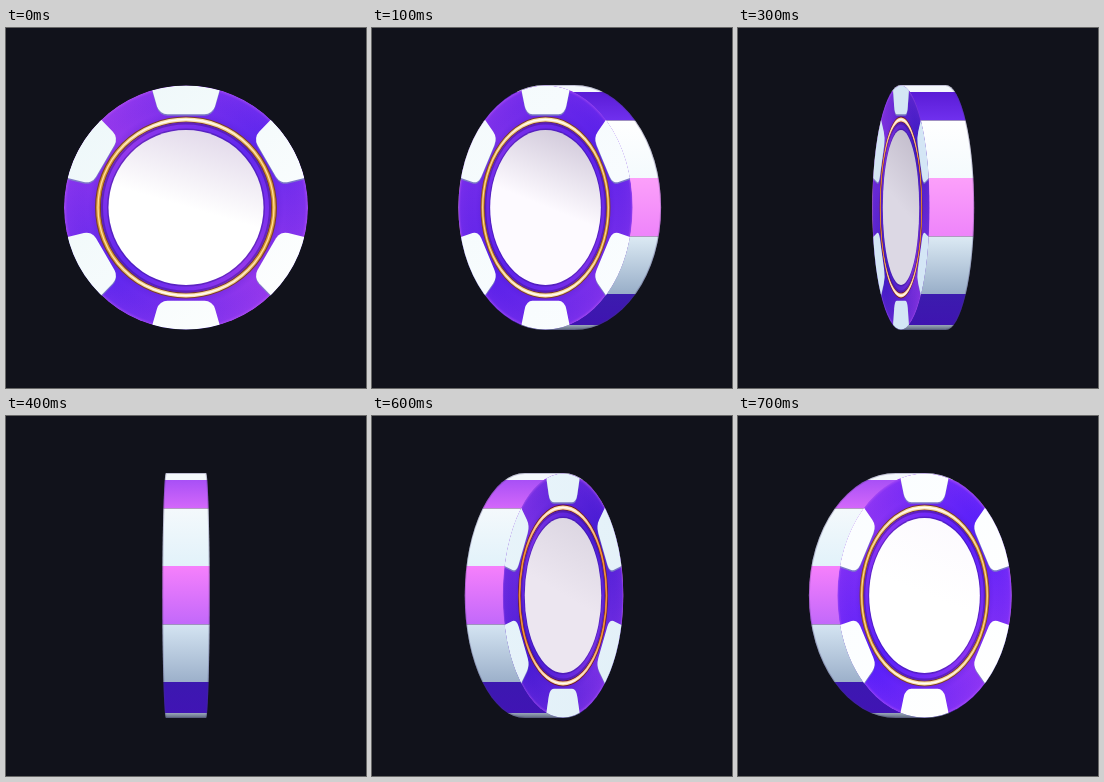
Write an HTML page with a canvas that moves like this. It is 360 px wide and 360 px high and loops after 0.8 s.

```html
<!DOCTYPE html>
<html lang="en">
<head>
<meta charset="utf-8">
<title>Spinning chip</title>
<style>
  html, body { margin: 0; width: 100%; height: 100%; overflow: hidden; background: #11121b; }
  canvas { display: block; width: 100vmin; height: 100vmin; }
</style>
</head>
<body>
<canvas id="stage" width="360" height="360"></canvas>
<script>
const ctx = document.getElementById('stage').getContext('2d');
const CY = 179.5, R = 122, STEP = 100, TAU = Math.PI * 2;
const HALF = 16 * Math.PI / 180;
const BANDS = [57, 64, 92.5, 150, 208.5, 266, 297, 303];

// Rim colours from top to bottom, each a vertical pair
const rightRim = [
  ['#f4f8fc', '#f4f8fc'], ['#5a1cd6', '#7030ee'], ['#ffffff', '#f4fafd'],
  ['#fca0fa', '#ee84fa'], ['#dceaf4', '#98aec8'], ['#3c1cae', '#3e14b0'], ['#9aa8ba', '#505a70']
];
const leftRim = [
  ['#f4f8fc', '#f4f8fc'], ['#a850f6', '#d468fa'], ['#f4f9fc', '#e2f2fa'],
  ['#f680fc', '#c268fa'], ['#d4e4f2', '#9cb0ca'], ['#3c18b0', '#4014b4'], ['#9aa8ba', '#505a70']
];

const bright = ['#7c4028', '#ffe6b4', '#d89838', '#ffdf94'];
const dull = ['#6e1c28', '#ffdcb0', '#e07a2c', '#f4a04c'];

// k: face width ratio, cx: face centre, depth: offset of the far side
const poses = [
  { k: 1, cx: 180, depth: 0, rim: rightRim, sheen: ['#9438ec', '#6128ee'], tab: ['#ecf7f9', '#ffffff'], plate: ['#e2d9ea', '#ffffff'], metal: bright },
  { k: .714, cx: 173.5, depth: 28.5, rim: rightRim, sheen: ['#7c30ea', '#5c22ea'], tab: ['#f4fafc', '#fafdff'], plate: ['#d2cadb', '#fdfaff'], metal: bright },
  { k: .494, cx: 169, depth: 37.5, rim: rightRim, sheen: ['#762ee0', '#4a1cd0'], tab: ['#dcedf7', '#d0e4f2'], plate: ['#c9c2d0', '#e0d9e6'], metal: dull },
  { k: .235, cx: 163, depth: 44.5, rim: rightRim, sheen: ['#7c30dc', '#421cc4'], tab: ['#d4e6f4', '#d4e6f6'], plate: ['#c4becd', '#dcd8e4'], metal: dull },
  { k: .03, cx: 160, depth: 40, rim: leftRim },
  { k: .235, cx: 197, depth: -45, rim: leftRim, sheen: ['#6024d0', '#3e18c0'], tab: ['#d8eaf6', '#cce2f2'], plate: ['#c9c2cd', '#d6cfdc'], metal: dull },
  { k: .494, cx: 191, depth: -38, rim: leftRim, sheen: ['#7830e4', '#4a1cd4'], tab: ['#e8f4fa', '#e2f0f8'], plate: ['#dcd6e2', '#ece6f0'], metal: dull },
  { k: .714, cx: 186.5, depth: -28.5, rim: leftRim, sheen: ['#8c34f4', '#5a20fa'], tab: ['#fafdff', '#ffffff'], plate: ['#fcfafe', '#ffffff'], metal: bright }
];

function blend(x0, y0, x1, y1, colours) {
  const g = ctx.createLinearGradient(x0, y0, x1, y1);
  colours.forEach((c, i) => g.addColorStop(i / (colours.length - 1), c));
  return g;
}

// Alternating warm and cool quarters, warm at the lower right
function sweep([warm, cool]) {
  const g = ctx.createConicGradient(TAU / 8, 0, 0);
  for (let i = 0; i <= 4; i++) g.addColorStop(i / 4, i % 2 ? cool : warm);
  return g;
}

function disc(r, fill) {
  ctx.beginPath();
  ctx.arc(0, 0, r, 0, TAU);
  ctx.fillStyle = fill;
  ctx.fill();
}

function ring(r, width, stroke) {
  ctx.beginPath();
  ctx.arc(0, 0, r, 0, TAU);
  ctx.lineWidth = width;
  ctx.strokeStyle = stroke;
  ctx.stroke();
}

function polar(r, a) {
  return [r * Math.cos(a), r * Math.sin(a)];
}

function tabPath(a) {
  const from = a - HALF, to = a + HALF;
  ctx.beginPath();
  ctx.arc(0, 0, R, from, to);
  ctx.arcTo(...polar(97, to), ...polar(97, from), 11);
  ctx.arcTo(...polar(97, from), ...polar(R, from), 11);
  ctx.closePath();
}

function drawTabs(fill) {
  ctx.fillStyle = fill;
  for (let i = 0; i < 6; i++) {
    tabPath(-Math.PI / 2 + i * TAU / 6);
    ctx.fill();
  }
}

function drawRim({ k, cx, depth, rim }) {
  const left = Math.min(cx, cx + depth), right = Math.max(cx, cx + depth);
  ctx.save();
  ctx.beginPath();
  ctx.ellipse(left, CY, R * k, R + .5, 0, TAU / 4, TAU * 3 / 4);
  ctx.ellipse(right, CY, R * k, R + .5, 0, -TAU / 4, TAU / 4);
  ctx.closePath();
  ctx.clip();
  rim.forEach((pair, i) => {
    const top = BANDS[i], end = BANDS[i + 1];
    ctx.fillStyle = blend(0, top, 0, end, pair);
    ctx.fillRect(0, i ? top : 0, 360, i < 6 ? end - (i ? top : 0) : 60);
  });
  ctx.lineWidth = 2;
  ctx.strokeStyle = 'rgba(70, 60, 120, .3)';
  ctx.stroke();
  ctx.restore();
}

function drawFace({ k, cx, sheen, tab, plate, metal }) {
  const [edge, tip, gold, shine] = metal;
  ctx.save();
  ctx.translate(cx, CY);
  ctx.scale(k, 1);
  ctx.beginPath();
  ctx.arc(0, 0, R, 0, TAU);
  ctx.clip();

  disc(R, sweep(sheen));
  const glow = ctx.createRadialGradient(0, 0, 88, 0, 0, R);
  glow.addColorStop(0, 'rgba(50, 10, 170, .2)');
  glow.addColorStop(.3, 'rgba(80, 20, 210, 0)');
  glow.addColorStop(.9, 'rgba(170, 70, 240, .1)');
  glow.addColorStop(1, 'rgba(205, 100, 245, .5)');
  disc(R, glow);

  ctx.save();
  ctx.translate(0, 1.5);
  drawTabs('rgba(125, 140, 190, .8)');
  ctx.restore();
  drawTabs(blend(-R, -R, R, R, tab));

  ring(88, 6, edge);
  ring(88, 3.8, blend(0, -90, 0, 90, [tip, gold, gold, gold, tip]));
  ring(88, 1.3, blend(0, -90, 0, 90, ['#ffffff', shine, shine, shine, '#ffffff']));
  disc(85, sweep(sheen));
  ring(84, 2, 'rgba(60, 16, 130, .45)');
  ring(78, 2, 'rgba(55, 20, 140, .45)');
  disc(77.5, blend(25, -77, -20, 77, [plate[0], plate[1], plate[1]]));
  ctx.restore();
}

function draw(pose) {
  ctx.fillStyle = '#11121b';
  ctx.fillRect(0, 0, 360, 360);
  if (pose.depth) drawRim(pose);
  if (pose.sheen) drawFace(pose);
}

let start = null, shown = -1;
function tick(now) {
  if (start === null) start = now;
  const i = Math.floor((now - start) / STEP) % poses.length;
  if (i !== shown) draw(poses[shown = i]);
  requestAnimationFrame(tick);
}
draw(poses[0]);
requestAnimationFrame(tick);
</script>
</body>
</html>
```
